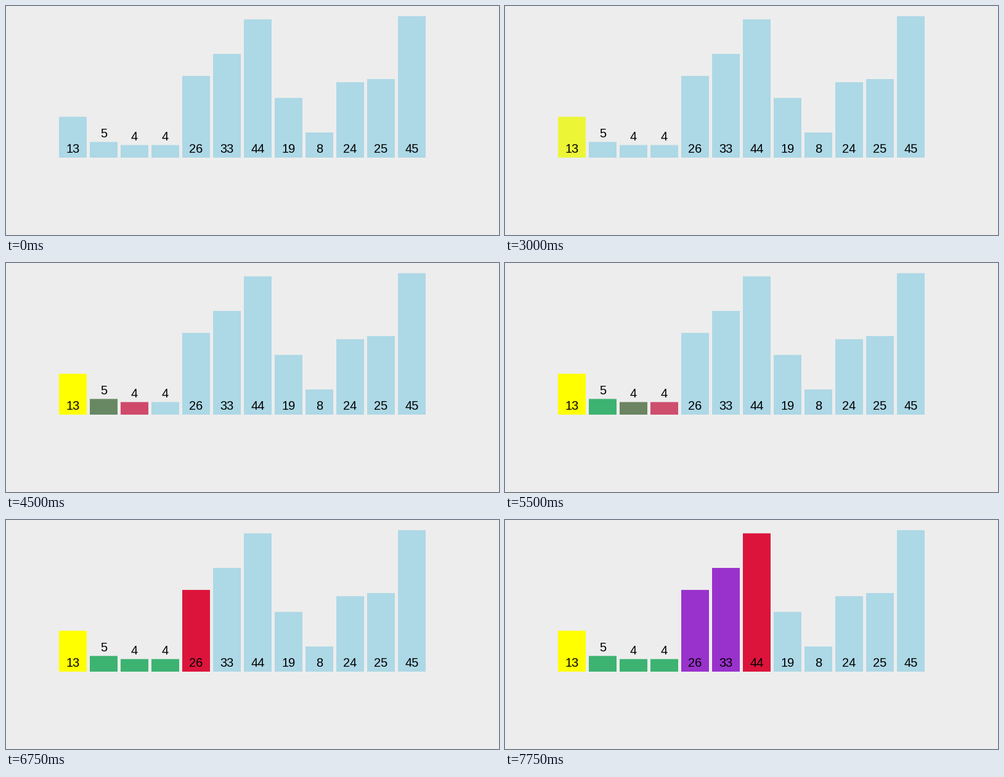
Recreate the animation shown at these times as a matplotlib script. Size 800x373 px, loop 8000 ms.

```python
import matplotlib.pyplot as plt
import numpy as np
from matplotlib.animation import FuncAnimation
from matplotlib.colors import to_rgb
from matplotlib.patches import Rectangle

W, H, DPI = 800, 373, 100
TICK, LOOP = 250, 8000            # ms

VALUES = [13, 5, 4, 4, 26, 33, 44, 19, 8, 24, 25, 45]
LEFT, PITCH, BAR_W = 86, 50, 45
BASE, UNIT = 247, 5.12            # bar foot and pixels per unit of value

IDLE, PIVOT, SCAN = "lightblue", "yellow", "crimson"
LESS, MORE = "mediumseagreen", "darkorchid"

FIRST, STEP, FADE = 2695, 503, 500   # ms


def partition_steps(last):
    """Colour changes as (step, bar, colour) for a quicksort partition."""
    changes = [(0, 0, PIVOT), (1, 1, SCAN)]
    step = 1
    for i in range(1, last):
        smaller = VALUES[i] < VALUES[0]
        step += 2 if smaller else 1      # a smaller value also takes a swap step
        changes += [(step, i, LESS if smaller else MORE), (step, i + 1, SCAN)]
    return changes


CHANGES = partition_steps(6)


def ease(t):
    t = min(max(t, 0), 1)
    return 4 * t**3 if t < 0.5 else 1 - 4 * (1 - t)**3


def bar_colors(ms):
    colors = [np.array(to_rgb(IDLE)) for _ in VALUES]
    for step, i, name in CHANGES:
        p = ease((ms - FIRST - step * STEP) / FADE)
        colors[i] = colors[i] + (np.array(to_rgb(name)) - colors[i]) * p
    return colors


fig = plt.figure(figsize=(W / DPI, H / DPI), dpi=DPI, facecolor="#ededed")
ax = fig.add_axes([0, 0, 1, 1])
ax.set(xlim=(0, W), ylim=(H, 0))
ax.axis("off")

bars = []
for i, v in enumerate(VALUES):
    x, top = LEFT + i * PITCH, BASE - v * UNIT
    bar = Rectangle((x, top), BAR_W, v * UNIT, lw=0, fc=IDLE, snap=False)
    bars.append(ax.add_patch(bar))
    label_y = BASE - 8 if v > 5 else int(top) - 7
    ax.text(x + BAR_W / 2, label_y, str(v), ha="center", va="baseline",
            family=["Liberation Sans", "DejaVu Sans"],
            size=20 * 72 / DPI, color="black")


def update(n):
    for bar, color in zip(bars, bar_colors(n * TICK)):
        bar.set_facecolor(np.clip(color, 0, 1))
    return bars


anim = FuncAnimation(fig, update, frames=LOOP // TICK, interval=TICK,
                     repeat=True, repeat_delay=0)
plt.show()
```
